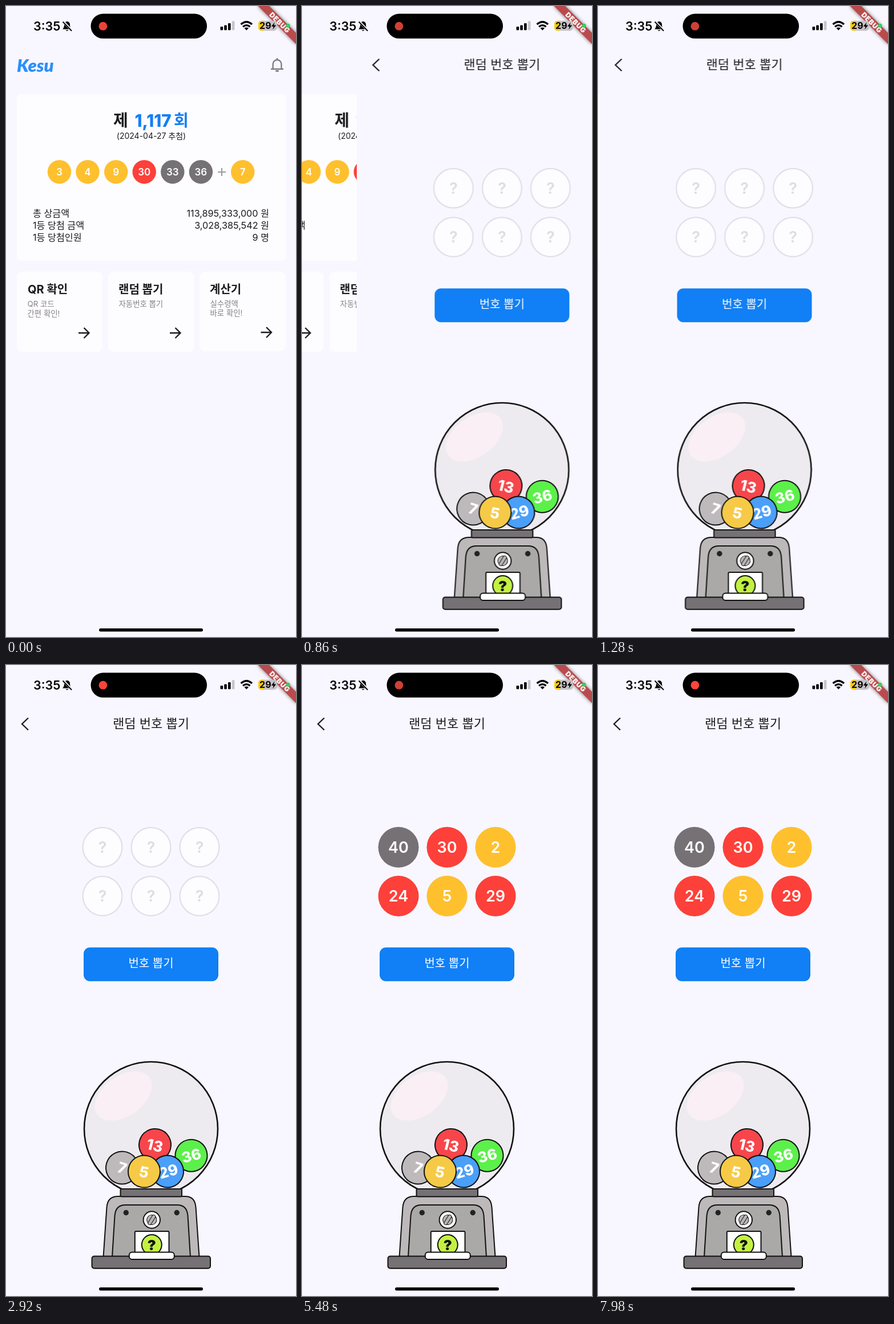
These frames come from a looping animation (508x1102 px, 8000 ms). An HTML page:

```html
<!DOCTYPE html>
<html lang="ko">
<head>
<meta charset="utf-8">
<title>번호 뽑기</title>
<style>
html, body { margin: 0; width: 100%; height: 100%; overflow: hidden; background: #f8f7ff; }
svg { display: block; width: 100vw; height: 100vh; }
text { font-family: Inter, "Noto Sans CJK KR", sans-serif; fill: #1c1b1f; }
.mid { text-anchor: middle; }
.end { text-anchor: end; }
.row { font-size: 16.2px; }
.head { font-size: 20px; font-weight: 700; }
.sub { font-size: 13.4px; fill: #85828a; }
.card { fill: #fdfcff; }
.num text { font-size: 17px; font-weight: 600; fill: #fff; text-anchor: middle; }
.slot text { font-size: 27px; font-weight: 600; text-anchor: middle; fill: #dedbe4; }
.slot circle { fill: #fdfcff; stroke: #e1dee7; stroke-width: 2.2; }
.drawn text { fill: #fff; }
.drawn circle { stroke: none; }
.line { fill: none; stroke: #1c1b1f; stroke-width: 2.3; }
.toy { stroke: #111; stroke-width: 2; }
.toy text { font-size: 26px; font-weight: 800; fill: #fff; stroke: none; text-anchor: middle; }
.num .y, .drawn .y { fill: #ffc02e; }
.num .r, .drawn .r { fill: #fd4039; }
.num .g, .drawn .g { fill: #757175; }

.home, .page, .drawn, .press, .rec { animation: 8s linear infinite; }
.home { animation-name: home; }
.page { animation-name: page; }
.drawn { animation-name: reveal; }
.press { animation-name: press; }
.rec { animation-name: rec; }

@keyframes home {
  0% { transform: translateX(0); }
  7.125% { transform: translateX(0); animation-timing-function: cubic-bezier(.35, .91, .33, .97); }
  18%, 100% { transform: translateX(-169.3px); }
}
/* two joined curves: quick start, long settle */
@keyframes page {
  0% { transform: translateX(508px); }
  7.125% { transform: translateX(508px); animation-timing-function: cubic-bezier(.283, .044, .545, .57); }
  9.278% { transform: translateX(233.2px); animation-timing-function: cubic-bezier(.209, 1, .435, .976); }
  18%, 100% { transform: translateX(0); }
}
@keyframes reveal {
  0% { opacity: 0; animation-timing-function: step-end; }
  57%, 100% { opacity: 1; }
}
@keyframes press {
  0%, 56% { opacity: 0; }
  59% { opacity: .1; }
  67%, 100% { opacity: 0; }
}
@keyframes rec {
  0% { fill: #ea4338; animation-timing-function: cubic-bezier(.3, .5, .6, 1); }
  15.3% { fill: #cd4035; animation-timing-function: cubic-bezier(.37, 0, .63, 1); }
  42.8% { fill: #ff453a; animation-timing-function: cubic-bezier(.37, 0, .63, 1); }
  70.3% { fill: #cd4035; animation-timing-function: cubic-bezier(.37, 0, .63, 1); }
  97.8%, 100% { fill: #ff453a; }
}
</style>
</head>
<body>
<svg viewBox="0 0 508 1102" preserveAspectRatio="none">
  <defs>
    <path id="arrow" class="line" d="M0 0H18M9.5-9L18.5 0L9.5 9"/>
    <filter id="soft" x="-30%" y="-60%" width="160%" height="220%">
      <feDropShadow dx="0" dy="0" stdDeviation="3" flood-color="#000" flood-opacity=".5"/>
    </filter>
  </defs>
  <rect width="508" height="1102" fill="#f8f7ff"/>

  <g class="home">
    <text x="19" y="115" style="font:italic 900 31px Lato,sans-serif;fill:#2a8ffa">Kesu</text>
    <g fill="none" stroke="#77747b" stroke-width="2.2">
      <path d="M464 110.2H486M467.6 110V101.5a7.4 7.4 0 0 1 14.8 0V110M475 94V91"/>
      <path d="M472.3 113.5H477.7" stroke-width="2.6"/>
    </g>

    <rect class="card" x="19" y="154" width="471" height="291" rx="6"/>
    <g font-size="28" font-weight="700">
      <text x="188" y="210">제</text>
      <text class="mid" x="257.5" y="211" style="font-size:29.5px;font-weight:800;fill:#147ff3">1,117</text>
      <text x="294" y="210" style="fill:#147ff3">회</text>
    </g>
    <text class="mid" x="254.5" y="232" font-size="14">(2024-04-27 추첨)</text>

    <g class="num">
      <circle class="y" cx="93.5" cy="289.7" r="20.7"/><text x="93.5" y="296">3</text>
      <circle class="y" cx="143" cy="289.7" r="20.7"/><text x="143" y="296">4</text>
      <circle class="y" cx="192.7" cy="289.7" r="20.7"/><text x="192.7" y="296">9</text>
      <circle class="r" cx="242.2" cy="289.7" r="20.7"/><text x="242.2" y="296">30</text>
      <circle class="g" cx="291.8" cy="289.7" r="20.7"/><text x="291.8" y="296">33</text>
      <circle class="g" cx="341.4" cy="289.7" r="20.7"/><text x="341.4" y="296">36</text>
      <path d="M371 290H385M378 283V297" stroke="#9b989f" stroke-width="2"/>
      <circle class="y" cx="414.7" cy="289.7" r="20.7"/><text x="414.7" y="296">7</text>
    </g>

    <g class="row">
      <text x="47" y="368">총 상금액</text><text class="end" x="461" y="368">113,895,333,000 원</text>
      <text x="47" y="389">1등 당첨 금액</text><text class="end" x="461" y="389">3,028,385,542 원</text>
      <text x="47" y="410">1등 당첨인원</text><text class="end" x="461" y="410">9 명</text>
    </g>

    <rect class="card" x="19" y="464" width="150" height="140" rx="9"/>
    <text class="head" x="38" y="502">QR 확인</text>
    <text class="sub" x="37.5" y="525">QR 코드</text>
    <text class="sub" x="37.5" y="542">간편 확인!</text>
    <use href="#arrow" x="127" y="571"/>

    <rect class="card" x="179" y="464" width="151" height="140" rx="9"/>
    <text class="head" x="197" y="502">랜덤 뽑기</text>
    <text class="sub" x="197.5" y="525">자동번호 뽑기</text>
    <use href="#arrow" x="287" y="571"/>

    <rect class="card" x="339" y="464" width="151" height="139" rx="9"/>
    <text class="head" x="357" y="502">계산기</text>
    <text class="sub" x="357.5" y="525">실수령액</text>
    <text class="sub" x="357.5" y="541">바로 확인!</text>
    <use href="#arrow" x="446.5" y="570"/>
  </g>

  <g class="page">
    <rect width="508" height="1102" fill="#f8f7ff"/>
    <path class="line" d="M39 92.5L28 103L39 113.5" stroke-width="2.7"/>
    <text class="mid" x="254" y="110" font-size="22">랜덤 번호 뽑기</text>

    <g class="slot">
      <circle cx="169" cy="318.3" r="34.4"/><text x="169" y="328">?</text>
      <circle cx="254" cy="318.3" r="34.4"/><text x="254" y="328">?</text>
      <circle cx="339" cy="318.3" r="34.4"/><text x="339" y="328">?</text>
      <circle cx="169" cy="403.5" r="34.4"/><text x="169" y="413">?</text>
      <circle cx="254" cy="403.5" r="34.4"/><text x="254" y="413">?</text>
      <circle cx="339" cy="403.5" r="34.4"/><text x="339" y="413">?</text>
    </g>
    <g class="slot">
      <g class="drawn">
        <circle class="g" cx="169" cy="318.3" r="35.5"/><text x="169" y="328">40</text>
        <circle class="r" cx="254" cy="318.3" r="35.5"/><text x="254" y="328">30</text>
        <circle class="y" cx="339" cy="318.3" r="35.5"/><text x="339" y="328">2</text>
        <circle class="r" cx="169" cy="403.5" r="35.5"/><text x="169" y="413">24</text>
        <circle class="y" cx="254" cy="403.5" r="35.5"/><text x="254" y="413">5</text>
        <circle class="r" cx="339" cy="403.5" r="35.5"/><text x="339" y="413">29</text>
      </g>
    </g>

    <rect x="136" y="493.3" width="236" height="59" rx="11" fill="#117ff5"/>
    <rect class="press" x="136" y="493.3" width="236" height="59" rx="11" fill="#fff"/>
    <text class="mid" x="254" y="528" font-size="20" style="fill:#fff">번호 뽑기</text>

    <g class="toy">
      <circle cx="254" cy="810" r="117" fill="#eeebf0" stroke-width="2.6"/>
      <ellipse cx="205.5" cy="752.7" rx="56" ry="35" transform="rotate(-35 205.5 752.7)" fill="#f9eff4" stroke="none"/>
      <g transform="translate(203.5 878) rotate(18)"><circle r="28.5" fill="#bebabc"/><text y="9.5">7</text></g>
      <g transform="translate(261 838) rotate(14)"><circle r="28" fill="#f6464b"/><text y="10.5">13</text></g>
      <g transform="translate(324.5 856.7) rotate(-15)"><circle r="28" fill="#5cf04a"/><text y="9.5">36</text></g>
      <g transform="translate(283 884.5) rotate(-16)"><circle r="28" fill="#4a9ff9"/><text x="1.5" y="9.5">29</text></g>
      <g transform="translate(242 884.5) rotate(12)"><circle r="28" fill="#f6ca47"/><text y="10.5">5</text></g>

      <path d="M170.5 1034L176.5 947Q178 928 196 928H314Q331 928 332.500 947L338.500 1034Z" fill="#bdb9bb"/>
      <rect x="200.500" y="915" width="107.500" height="13.500" rx="2" fill="#757175"/>
      <path d="M186 1034L190.500 962Q192 943 209 943H300Q317 943 318.500 962L323 1034Z" fill="#aaa9a8"/>
      <rect x="150.500" y="1032.500" width="207.500" height="21.300" rx="4" fill="#757175"/>
      <circle cx="210.300" cy="956.500" r="4.700" fill="#222" stroke="none"/>
      <circle cx="299.200" cy="956.500" r="4.700" fill="#222" stroke="none"/>
      <circle cx="255.300" cy="969" r="14.700" fill="#fff"/>
      <g transform="translate(255.300 969) rotate(32)" stroke-width="1" fill="#b9b5b7">
        <circle r="8.600"/>
        <rect x="-3" y="-9.500" width="6" height="19" rx="3"/>
      </g>
      <rect x="225.800" y="989" width="59.700" height="42" rx="2" fill="#fff"/>
      <circle cx="255.300" cy="1012.500" r="17.500" fill="#c3f141"/>
      <text x="255.300" y="1021.500" style="fill:#111;font-weight:900;font-size:25px">?</text>
      <rect x="215.800" y="1025.500" width="79" height="12.500" rx="5" fill="#fff"/>
    </g>
  </g>

  <g transform="translate(508 0) rotate(45)">
    <rect x="-47.200" y="33.100" width="94.400" height="14.100" fill="#b94b4e" filter="url(#soft)"/>
    <text class="mid" x="0.500" y="44.500" style="font-size:12px;font-weight:900;fill:#fff;letter-spacing:.8px">DEBUG</text>
  </g>

  <text x="48" y="42.500" font-size="21.500" font-weight="600" style="fill:#000">3:35</text>
  <path d="M99 40.500Q102 38 102 33Q102 27.500 107 27Q112 27.500 112 33Q112 38 115 40.500ZM104.500 42H109.500Q107 45 104.500 42Z"/>
  <path d="M100 27L115.500 43" stroke="#f8f7ff" stroke-width="4"/>
  <path d="M99.500 27.500L115 43.500" stroke="#000" stroke-width="1.800"/>
  <rect x="148.500" y="13.500" width="203.500" height="43.300" rx="21.600"/>
  <circle class="rec" cx="169.900" cy="35.200" r="7.400"/>
  <rect x="375.500" y="36" width="4.600" height="6.300" rx="1.200"/>
  <rect x="382.200" y="33.500" width="4.600" height="8.800" rx="1.200"/>
  <rect x="389" y="30" width="4.600" height="12.300" rx="1.200"/>
  <rect x="395.800" y="26.300" width="4.600" height="16" rx="1.200" fill="#c6c5ca"/>
  <path d="M411.500 32Q421.300 23.500 431 32M415 36.200Q421.300 31 427.500 36.200" fill="none" stroke="#000" stroke-width="3.200"/>
  <path d="M417.500 38.800Q421.300 36 425 38.800L421.300 42.500Z"/>
  <rect x="442" y="25.800" width="33" height="17.400" rx="5.500" fill="#c6c2c6"/>
  <path d="M452 25.800H447.500A5.500 5.500 0 0 0 442 31.300V37.700A5.500 5.500 0 0 0 447.500 43.200H452Z" fill="#fc0"/>
  <text class="mid" x="454.300" y="40.300" font-size="16" font-weight="700" style="fill:#000">29</text>
  <path d="M470.500 28.500L464.800 35.700H468.500L467.300 41L473.200 33.600H469.300Z"/>
  <circle cx="494" cy="34.300" r="3.500" fill="#30d158"/>
  <rect x="163" y="1087" width="182" height="5.500" rx="2.700"/>
</svg>
</body>
</html>
```
